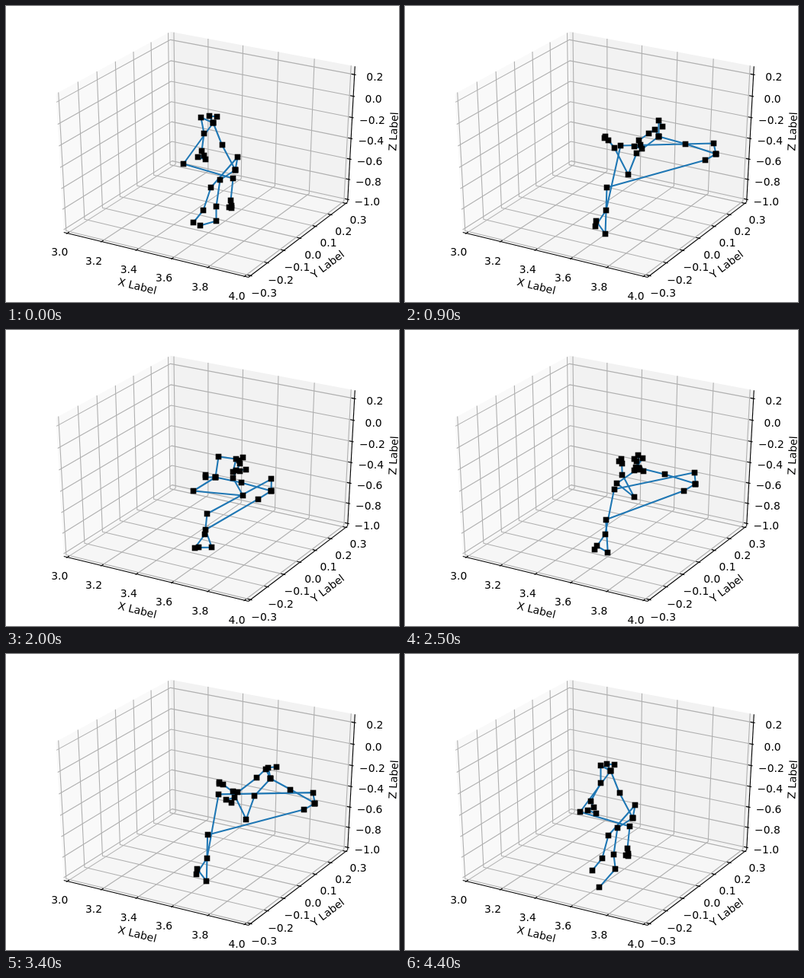
Animation, 515 px wide and 389 px high, one loop 4500 ms. Source, as an HTML page with a canvas:

```html
<!DOCTYPE html>
<html lang="en">
<head>
<meta charset="utf-8">
<title>Skeleton motion</title>
<style>
html, body { margin: 0; width: 100%; height: 100%; overflow: hidden; background: #fff; }
canvas { display: block; }
</style>
</head>
<body>
<canvas id="stage" width="515" height="389"></canvas>
<script>
const ctx = document.getElementById('stage').getContext('2d');
const LOOP = 4500, STEP = 100;
const EM = 13.89;                 // 10 pt text
const THIN = 1.11;                // 0.8 pt line
const EDGE = 0.5 + 1 / 48;        // panes reach slightly past the data limits
const TICK_PAD = 0.0738, NAME_PAD = 0.1605;

const lerp = (a, b, k) => a + (b - a) * k;

// ---- Key poses: only the joints that move freely ----
// body: base, chest, neck, head, two knees; arm: shoulder, elbow, wrist, fingertip
const stand = {
  body: [300,215, 271,153, 266,144, 276,145, 268,238, 275,263],
  armA: [255,146, 259,167, 256,190, 261,201],
  armB: [232,207, 297,226, 294,255, 295,265],
  drop: [0]
};
const lean = {
  body: [301,214, 274,153, 263,146, 271,141, 270,239, 275,254],
  armA: [279,156, 275,179, 271,191, 263,202],
  armB: [235,203, 300,222, 289,189, 278,174],
  drop: [0]
};
const rise = {
  body: [353,205, 273,171, 258,166, 270,154, 266,239, 269,245],
  armA: [271,156, 278,168, 279,206, 277,230],
  armB: [258,202, 325,211, 312,180, 300,160],
  drop: [0]
};
const crouch = {
  body: [347,211, 274,193, 261,193, 261,190, 263,241, 261,262],
  armA: [278,166, 301,169, 297,186, 314,183],
  armB: [245,211, 310,217, 297,194, 310,167],
  drop: [0]
};
const sit = {
  body: [407,194, 332,171, 332,150, 337,158, 282,183, 264,238],
  armA: [327,162, 319,167, 306,176, 310,187],
  armB: [303,193, 292,221, 274,186, 262,171],
  drop: [0]
};
const reach = {
  body: [401,198, 365,153, 358,147, 377,134, 273,185, 263,236],
  armA: [357,136, 341,155, 300,188, 275,205],
  armB: [355,176, 344,211, 327,173, 302,163],
  drop: [0]
};
const shiftX = (flat, dx) => flat.map((v, i) => i % 2 ? v : v + dx);
const settle = drop => ({
  body: shiftX(stand.body, -2),
  armA: [256,146, 256,169, 243,193, 250,209],
  armB: shiftX(stand.armB, -3),
  drop: [drop]
});

function mix(a, b, k) {
  const out = {};
  for (const part in a) out[part] = a[part].map((v, i) => lerp(v, b[part][i], k));
  return out;
}

const keys = [
  [0, stand], [500, lean], [600, lean], [900, sit], [1050, reach], [1300, rise],
  [1600, lean], [1700, lean], [2000, crouch], [2900, sit], [3100, sit],
  [3800, reach], [4000, reach], [4200, mix(reach, crouch, 0.55)],
  [4300, settle(55)], [4400, settle(18)], [LOOP, stand]
];

function poseAt(t) {
  const i = keys.findIndex(key => key[0] > t);
  const [t0, a] = keys[i - 1], [t1, b] = keys[i];
  return mix(a, b, (t - t0) / (t1 - t0));
}

// ---- Remaining joints follow from the key joints ----
const between = (p, q, k, dx = 0, dy = 0) => [lerp(p[0], q[0], k) + dx, lerp(p[1], q[1], k) + dy];

function pairs(flat) {
  const out = [];
  for (let i = 0; i < flat.length; i += 2) out.push([flat[i], flat[i + 1]]);
  return out;
}

function arm(flat, palm, thumbX) {
  const [shoulder, elbow, wrist, tip] = pairs(flat);
  const hand = between(wrist, tip, palm);
  return [shoulder, elbow, wrist, hand, between(hand, tip, 0.5, thumbX), tip];
}

function skeleton(pose) {
  const [base, chest, neck, head, kneeA, kneeB] = pairs(pose.body);
  const [x, y] = base;
  const k = (x - 300) / 107;     // 0 standing, 1 seated
  const mid = between(base, chest, 0.5, -3, -2);
  const hipA = [x + 3 - 6 * k, y - 17 + 3 * k];
  const hipB = [x - 20 + 6 * k, y + 13 - 5 * k];
  const ankleB = [275 - 13 * k, 282 + 17 * k * k];
  const footB = [254 - 4 * k, 288 - 6 * k + pose.drop[0]];
  return [
    [base, mid, chest, neck, head],
    [base, hipA, kneeA, [258 + 5 * k, 268], [245 + 4 * k, 284 + 5 * k]],
    [base, hipB, kneeB, ankleB, footB],
    [chest, ...arm(pose.armA, 0.5, -9)],
    [chest, ...arm(pose.armB, 0.7, -3)]
  ];
}

// ---- Perspective view of the unit cube, azimuth -60, elevation 30 ----
function project([x, y, z]) {
  const w = 10 - (0.433 * x - 0.75 * y + 0.5 * z);
  const right = 0.866 * x + 0.5 * y;
  const up = -0.25 * x + 0.433 * y + 0.866 * z;
  return [264.7 + 2681 * right / w, 189.4 - 1997.8 * up / w];
}

function trace(points) {
  ctx.beginPath();
  points.forEach(p => ctx.lineTo(...p));
}

function line(color, ...points) {
  trace(points.map(project));
  ctx.strokeStyle = color;
  ctx.lineWidth = THIN;
  ctx.stroke();
}

function pane(color, ...points) {
  trace(points.map(project));
  ctx.fillStyle = color;
  ctx.fill();
}

function label(text, point, drop, angle = 0) {
  ctx.save();
  ctx.translate(...project(point));
  ctx.rotate(angle);
  ctx.fillText(text, 0, drop);
  ctx.restore();
}

// place(v, d): point at v along the axis edge, pushed outward by d
// mark(v, d): the same, pushed along the tick direction only
const e = EDGE;
const axes = [
  {
    name: 'X Label', lo: 3, hi: 4, step: 0.2, count: 6,
    place: (v, d) => [v, -e - d, -e - d], mark: (v, d) => [v, -e - d, -e],
    grid: v => [[v, -e, -e], [v, e, -e], [v, e, e]]
  },
  {
    name: 'Y Label', lo: -0.3, hi: 0.3, step: 0.1, count: 7,
    place: (v, d) => [e + d, v, -e - d], mark: (v, d) => [e + d, v, -e],
    grid: v => [[e, v, -e], [-e, v, -e], [-e, v, e]]
  },
  {
    name: 'Z Label', lo: -1, hi: 0.25, step: 0.2, count: 7,
    place: (v, d) => [e + d, e + d, v], mark: (v, d) => [e + d, e, v],
    grid: v => [[-e, -e, v], [-e, e, v], [e, e, v]]
  }
];

function ticks({ lo, hi, step, count }) {
  return Array.from({ length: count }, (_, i) => {
    const tenths = Math.round((lo + i * step) * 10);
    const text = (Math.abs(tenths) / 10).toFixed(1);
    return { at: (tenths / 10 - lo) / (hi - lo) - 0.5, text: (tenths < 0 ? '\u2212' : '') + text };
  });
}

function drawAxes() {
  pane('#f9f9f9', [-e,-e,-e], [-e,e,-e], [-e,e,e], [-e,-e,e]);
  pane('#f2f2f2', [-e,e,-e], [e,e,-e], [e,e,e], [-e,e,e]);
  pane('#f6f6f6', [-e,-e,-e], [e,-e,-e], [e,e,-e], [-e,e,-e]);

  for (const axis of axes) {
    for (const { at } of ticks(axis)) line('#b0b0b0', ...axis.grid(at));
  }

  ctx.font = EM + 'px "DejaVu Sans", sans-serif';
  ctx.textAlign = 'center';
  ctx.fillStyle = '#000';
  for (const axis of axes) {
    const ends = [axis.place(-e, 0), axis.place(e, 0)];
    line('#000', ...ends);
    for (const { at, text } of ticks(axis)) {
      line('#000', axis.mark(at, -1 / 60), axis.mark(at, 1 / 120));
      label(text, axis.place(at, TICK_PAD), 0.76 * EM);
    }
    const [[x0, y0], [x1, y1]] = ends.map(project);
    label(axis.name, axis.place(0, NAME_PAD), 0.26 * EM, Math.atan2(y1 - y0, x1 - x0));
  }
}

function drawBody(pose) {
  const chains = skeleton(pose);
  ctx.strokeStyle = '#1f77b4';
  ctx.lineWidth = 2.08;
  ctx.lineJoin = 'round';
  for (const chain of chains) {
    trace(chain.map(([x, y]) => [x + 0.5, y + 0.5]));
    ctx.stroke();
  }
  ctx.fillStyle = '#000';
  const size = 7.6;
  for (const [x, y] of chains.flat()) {
    ctx.fillRect(Math.round(x) + 0.5 - size / 2, Math.round(y) + 0.5 - size / 2, size, size);
  }
}

function draw(now) {
  const t = Math.floor((now % LOOP) / STEP) * STEP;
  ctx.fillStyle = '#fff';
  ctx.fillRect(0, 0, 515, 389);
  drawAxes();
  drawBody(poseAt(t));
}

let start = null;
function tick(now) {
  if (start === null) start = now;
  draw(now - start);
  requestAnimationFrame(tick);
}
draw(0);
requestAnimationFrame(tick);
</script>
</body>
</html>
```
